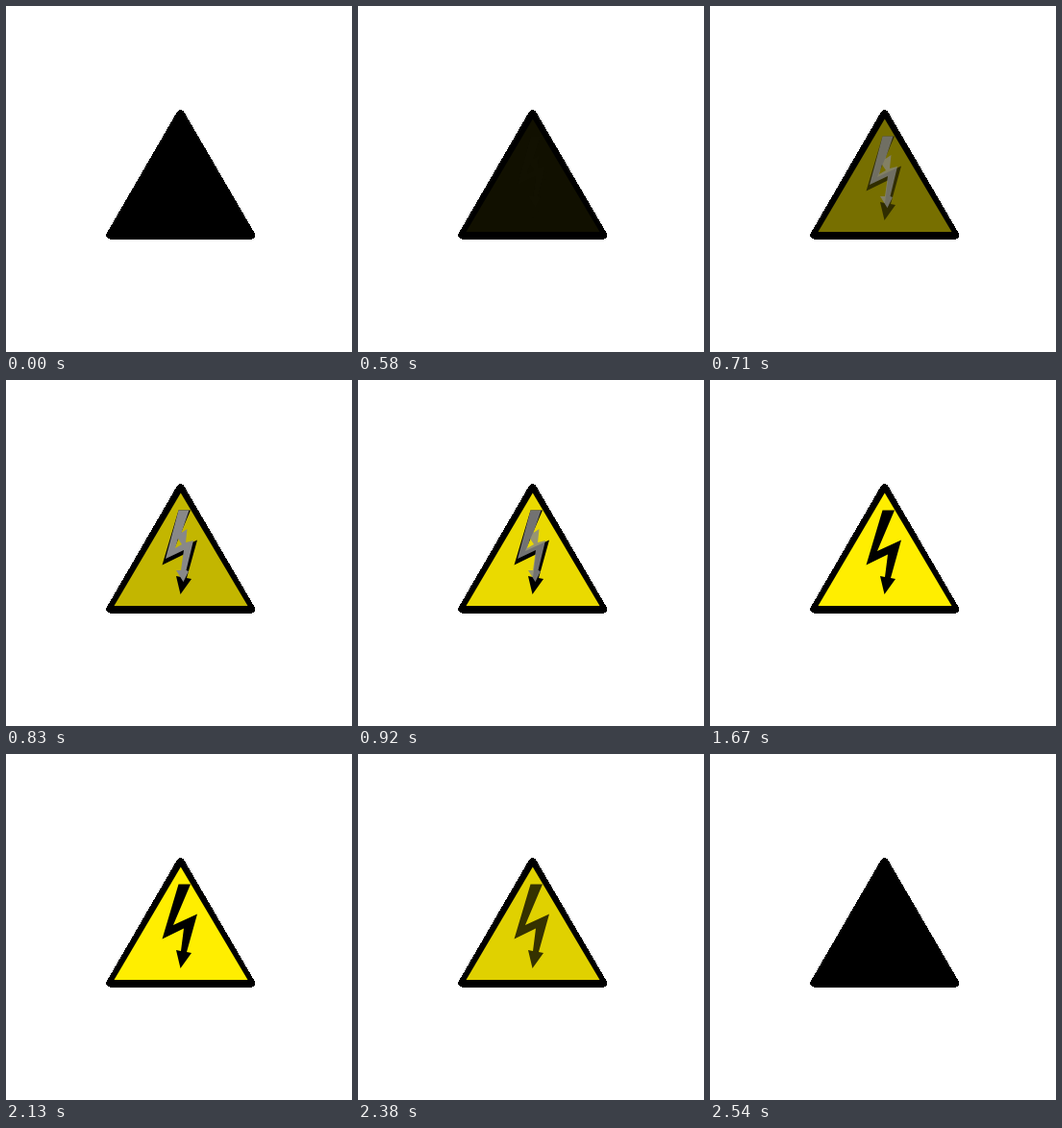
These frames come from a looping animation (360x360 px, 2870 ms). An HTML page:

```html
<!DOCTYPE html>
<html lang="en">
<head>
<meta charset="utf-8">
<style>
  html, body { margin: 0; width: 100%; height: 100%; overflow: hidden; background: #fff; }
  svg { display: block; width: 100vw; height: 100vh; }
</style>
</head>
<body>
<svg viewBox="0 0 360 360">
  <path d="M181.6 112.3 L255 238.4 H108.5 Z" stroke="#000" stroke-width="8.4" stroke-linejoin="round" shape-rendering="crispEdges"/>
  <path id="panel" d="M181.8 117.5 L251.5 235 H112.5 Z"/>
  <path id="bolt" d="M179.5 135.5 H192 L174 178 L199 166.5 L188 206 L193 207 L181.5 223 L177 204 L182 205 L185 181.5 L162.5 192.5 Z"/>
  <path id="flash" fill="#888" fill-rule="evenodd" d="M179.5 135.5 H190.5 L182.5 159 L188.5 155 L187 169 L195 167 L187.5 198 L190 199 L184.5 210 L177 198 L182 198 L185 177 L166 186 Z M179 165 L183 171 L176 175 Z"/>
</svg>
<script>
const LOOP = 2870, FADE_IN = 580, FADE_OUT = 2240, DARK = 2540;
const [panel, bolt, flash] = ['panel', 'bolt', 'flash'].map(id => document.getElementById(id));
const progress = (t, from, to) => Math.min(1, Math.max(0, (t - from) / (to - from)));

function draw(now) {
  const t = now % LOOP;
  const lit = t >= FADE_IN && t < DARK;
  const rise = Math.sin(progress(t, 560, 1050) * Math.PI / 2);
  const fall = progress(t, FADE_OUT, DARK);
  const level = lit ? rise * (1 - fall ** 2.8) : 0;

  panel.setAttribute('fill', `rgb(${255 * level}, ${238 * level}, 0)`);
  bolt.setAttribute('opacity', lit ? progress(t, FADE_IN, 800) * (1 - fall ** 1.9) : 0);
  flash.setAttribute('opacity', Math.sin(progress(t, FADE_IN, 1080) * Math.PI));
  requestAnimationFrame(() => draw(performance.now() - start));
}

const start = performance.now();
draw(0);
</script>
</body>
</html>
```
